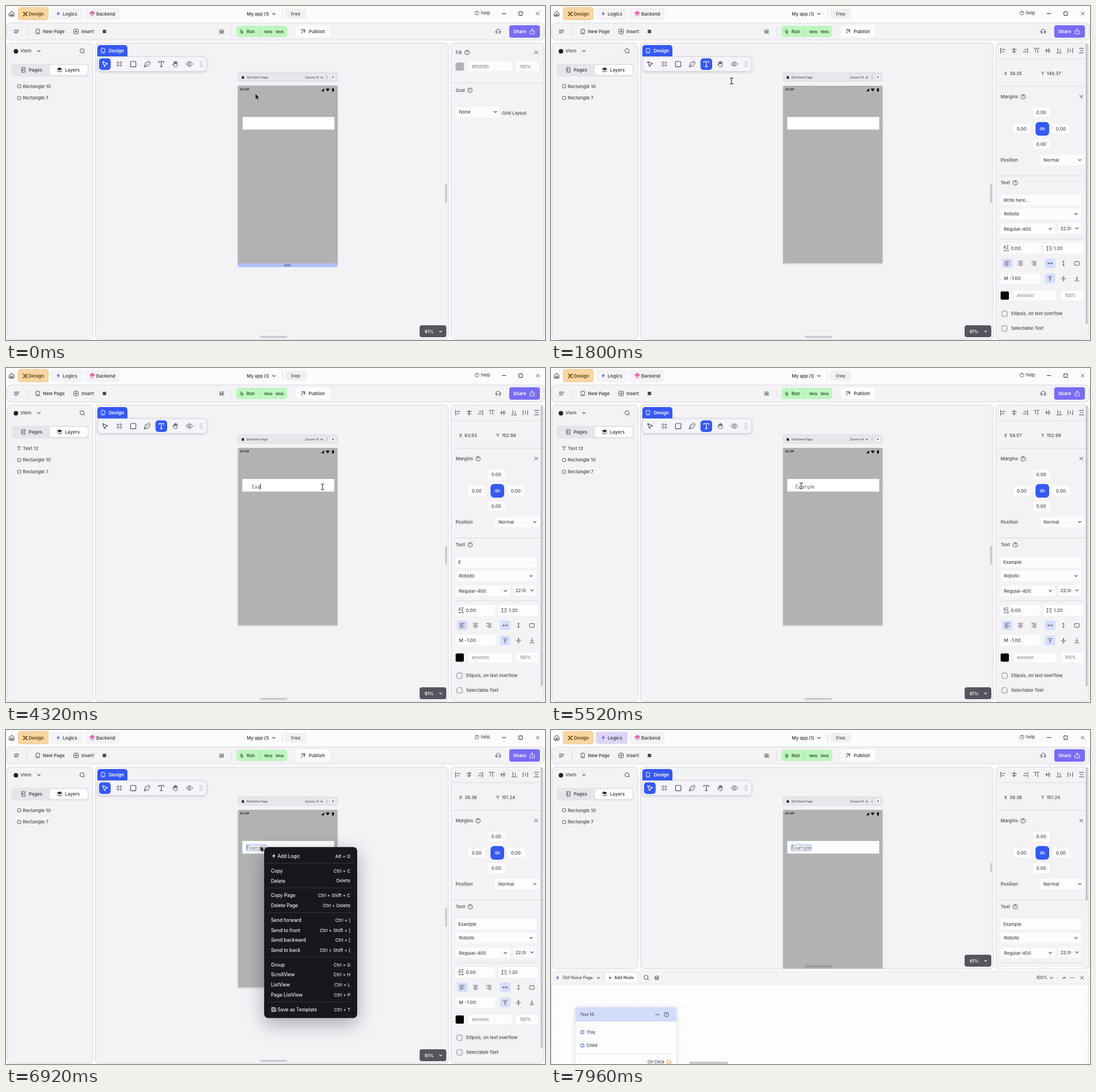
Write an HTML page with a canvas that moves like this. It is 950 px wide and 590 px high and loops after 8000 ms.

```html
<!DOCTYPE html>
<html lang="en">
<head>
<meta charset="utf-8">
<title>App builder</title>
<style>
html, body { margin: 0; width: 100%; height: 100%; overflow: hidden; background: #fbfbfd; }
canvas { display: block; width: 950px; height: 590px; }
</style>
</head>
<body>
<canvas id="stage"></canvas>
<script>
const W = 950, H = 590, LOOP = 8000;
const BLUE = '#3559f4', INK = '#48484e', DARK = '#232328', PANEL = '#f3f3f6', EDGE = '#cfcfd8';
const BRAND = 'Vlem', DEVICE = 'Zuvone 14';
const canvas = document.getElementById('stage');
const dpr = window.devicePixelRatio || 1;
canvas.width = W * dpr;
canvas.height = H * dpr;
const c = canvas.getContext('2d');

// Times in ms
const AT = { tip: 440, pick: 1560, place: 3600, commit: 5300, select: 5760, drop: 6240, menu: 6600, logic: 7400 };
const KEYS = [4020, 4150, 4270, 4480, 4620, 4760, 4900];
const PATH = [
  [0, 440, 156], [60, 440, 156], [420, 310, 103], [AT.pick, 273, 103], [1900, 330, 140],
  [2500, 492, 214], [2880, 492, 214], [3450, 434, 210], [3800, 434, 210], [4200, 558, 210],
  [4750, 558, 210], [5400, 441, 208], [5900, 441, 208], [6200, 434, 206], [6500, 449, 206],
  [7000, 449, 206], [7200, 490, 222], [LOOP, 490, 222]
];

const lerp = (a, b, k) => a + (b - a) * k;
const ease = k => k * k * (3 - 2 * k);
const part = (t, a, b) => ease(Math.min(1, Math.max(0, (t - a) / (b - a))));

function box(x, y, w, h, r, fill, stroke, lw = 0.8) {
  c.beginPath();
  c.roundRect(x, y, w, h, r);
  if (fill) { c.fillStyle = fill; c.fill(); }
  if (stroke) { c.strokeStyle = stroke; c.lineWidth = lw; c.stroke(); }
}

function shadowBox(x, y, w, h, r, fill, blur, dy, shade) {
  c.save();
  c.shadowColor = shade;
  c.shadowBlur = blur * dpr;
  c.shadowOffsetY = dy * dpr;
  box(x, y, w, h, r, fill);
  c.restore();
}

function text(s, x, y, size = 8, weight = 500, color = INK, align = 'left', family = 'Inter') {
  c.font = `${weight} ${size}px ${family}, sans-serif`;
  c.textAlign = align;
  c.fillStyle = color;
  c.fillText(s, x, y + size * 0.36);
}

// SVG path data drawn around a centre point
function icon(d, x, y, color = INK, lw = 1, fill = false) {
  c.save();
  c.translate(x, y);
  c.lineCap = c.lineJoin = 'round';
  const p = new Path2D(d);
  if (fill) { c.fillStyle = color; c.fill(p); }
  if (lw) { c.strokeStyle = color; c.lineWidth = lw; c.stroke(p); }
  c.restore();
}

function dot(x, y, r, fill, stroke, lw = 0.9) {
  c.beginPath();
  c.arc(x, y, r, 0, 7);
  if (fill) { c.fillStyle = fill; c.fill(); }
  if (stroke) { c.strokeStyle = stroke; c.lineWidth = lw; c.stroke(); }
}

function rule(x1, y1, x2, y2, color = '#d3d3da', lw = 0.8) {
  icon(`M${x1} ${y1}L${x2} ${y2}`, 0, 0, color, lw);
}

function clip(x, y, w, h, r, draw) {
  c.save();
  c.beginPath();
  c.roundRect(x, y, w, h, r);
  c.clip();
  draw();
  c.restore();
}

const chevron = (x, y, color = INK, s = 2.3) => icon(`M${-s} ${-s / 2}L0 ${s / 2}L${s} ${-s / 2}`, x, y, color, 1.1);
const cross = (x, y) => icon('M-2.6-2.6L2.6 2.6M2.6-2.6L-2.6 2.6', x, y, INK, 1);
const search = (x, y) => { dot(x - 0.5, y - 0.5, 3.6, null, INK, 1); icon('M2.2 2.2L4 4', x, y); };
const more = (x, y) => [-2.5, 0, 2.5].forEach(d => dot(x + d, y, 0.85, INK));
const field = (x, y, w, h) => box(x, y, w, h, 3, '#fdfdfe');

function help(x, y) {
  dot(x, y, 4, null, INK, 0.9);
  text('?', x, y, 6, 600, INK, 'center');
}

function bug(x, y) {
  icon('M-2-1.2C-2-4 2-4 2-1.2V1.5C2 4.4-2 4.4-2 1.5ZM-4 .4H-2M2 .4H4M-3.7-3L-2-1.6M3.7-3L2-1.6M-3.7 3.6L-2 2.3M3.7 3.6L2 2.3M-1 0H1M-1 1.7H1', x, y, INK, 0.9);
}

const BOLT = 'M1-4.2L-2.8 .8H-.4L-1 4.2L2.8-.9H.4Z';
const PHONE = 'M-2-4H2Q3-4 3-3V3Q3 4 2 4H-2Q-3 4-3 3V-3Q-3-4-2-4M-.8 2.4H.8';
const HOME = 'M-4-.5L0-4.3L4-.5V4.2H-4ZM-1.2 4V1H1.2V4';

function titleBar(logicOn) {
  icon(HOME, 10, 13.5, DARK, 1);
  box(21.5, 2.5, 53, 22, 4, '#fad5a0', '#efc186');
  icon('M-3.2 3.2L3.2-3.2M-3.2-3.2L3.2 3.2', 34, 14, '#6b4a16', 1.8);
  text('Design', 40, 14, 8, 600, '#594019');
  box(79, 3, 56, 21.5, 4, logicOn ? '#dcd5f7' : '#f4f4f7');
  icon(BOLT, 92, 13.5, '#5c5cf2', 0, true);
  text('Logics', 100, 14, 8, 600);
  box(138.5, 3, 62, 21.5, 4, '#f3f3f6');
  icon('M-3 1C-5.4 .6-4.4-2.3-2.3-2C-1.5-4.8 2.6-4.6 2.7-1.8C5-1.7 4.7 1 3 1Z', 152, 13, '#ef62a6', 0.5, true);
  icon('M-2 2V4M0 2V5M2 2V4', 152, 13, '#e05aa8', 1);
  text('Backend', 159, 14, 8, 600);
  text('My app (1)', 424.5, 14, 7.8, 600);
  chevron(472, 14);
  rule(487.5, 5, 487.5, 22);
  box(492, 5, 37, 17, 4, '#f0f0f3');
  text('Free', 510.5, 14, 7.8, 500, INK, 'center');
  dot(830, 12.5, 3.4, null, INK, 0.8);
  text('?', 830, 12.5, 5, 600, INK, 'center');
  text('help', 837, 12.5, 7.8);
  rule(874.5, 13.5, 881, 13.5, DARK, 1);
  box(904, 10.3, 6.2, 6.2, 0.5, null, DARK, 1);
  cross(937, 13.5);
}

function toolbar() {
  box(1.5, 30, 947, 30, 7, PANEL, EDGE);
  icon('M-4-2.5H4M-4 0H4M-4 2.5H2', 18.5, 45, INK, 1);
  rule(37.5, 38, 37.5, 52);
  icon(PHONE, 56, 45);
  text('New Page', 65, 45, 7.9, 600);
  box(119.5, 41, 8, 8, 1.5, null, INK, 1);
  icon('M-2 0H2M0-2V2', 123.5, 45, INK, 1);
  text('Insert', 133, 45, 7.9, 600);
  box(170.5, 42, 6, 6, 0, INK);
  bug(380, 45);
  rule(397.5, 38, 397.5, 52);
  box(406, 35, 89.5, 20, 5, '#bff6bf');
  icon('M-1.5-3V1L-3 0L0 4H2L3 1V-1L.5-.5V-3Z', 415, 45, '#5fa565', 0.6, true);
  text('Run', 424, 45, 7.8, 600, '#31523a');
  rule(447, 38, 447, 52, '#a1dca4');
  text('Web', 455, 45.3, 6.8, 600, '#31523a');
  text('Web', 475, 45.3, 6.8, 600, '#31523a');
  box(511, 34.5, 60, 20.5, 4, '#fefefe');
  icon('M-3 3L3-3M-1.5-3H3V1.5M-3.2-2L-2-3', 523.5, 45, DARK, 1);
  text('Publish', 533.5, 45, 8, 600);
  icon('M-4 1V0C-4-5.2 4-5.2 4 0V1M-4 0H-1.8V3.2H-3.4L-4 2ZM4 0H1.8V3.2H3.4L4 2Z', 867.5, 45, INK, 0.9);
  box(887, 34, 54, 22, 4, '#796cf6');
  text('Share', 894, 45, 8.1, 600, '#fff');
  icon('M0 1V-4.5M-2-2.7L0-4.5L2-2.7M-2.4-.8H-4V4.2H4V-.8H2.4', 927.5, 45, '#fff', 0.9);
}

function leftPanel(bottom, hasText) {
  box(2, 65.5, 151, bottom - 65.5, 7, PANEL, EDGE);
  dot(17.5, 80, 4, '#222226');
  text(BRAND, 25.5, 79.5, 7.9, 500);
  chevron(58, 79.5);
  search(134.5, 79.5);
  box(9.5, 102, 136, 22.5, 5, '#e6e6ea');
  shadowBox(77, 104, 67, 18.5, 5, '#fff', 2, 0.5, 'rgba(0,0,0,.15)');
  icon('M-2.5-4H3V4H-2.5V2M-2.5-4V-2M-4.5 0H0M-1.5-1.7L.2 0L-1.5 1.7', 30.5, 113, INK, 1);
  text('Pages', 40, 113, 8, 600);
  icon('M0-4L4.3-1.8L0 .4L-4.3-1.8Z', 94.5, 113, DARK, 0.6, true);
  icon('M-4 .8L0 3L4 .8', 94.5, 113.5, DARK, 1);
  text('Layers', 104, 113, 8, 600);
  const rows = ['Rectangle 10', 'Rectangle 7'];
  if (hasText) rows.unshift('Text 12');
  rows.forEach((name, i) => {
    const y = 141.7 + i * 20.8;
    if (name[0] === 'T') icon('M-2.7-1.5V-2.8H2.7V-1.5M0-2.8V2.8M-1 2.8H1', 23, y, INK, 0.8);
    else box(20.3, y - 2.7, 5.6, 5.6, 0.8, null, INK, 0.9);
    text(name, 29.5, y, 8.1);
  });
}

function tools(active) {
  box(161, 69, 53, 20, [5, 5, 0, 0], BLUE);
  icon(PHONE, 171, 79, '#fff', 0.9);
  text('Design', 181, 79, 8, 600, '#fff');
  shadowBox(161.5, 89.5, 192, 26, 6, '#f4f4f9', 4, 1, 'rgba(60,60,90,.3)');
  box(161.5, 89.5, 192, 26, 6, null, '#d4d4de');
  box(active === 'text' ? 263.5 : 164, 92.5, 20.5, 20.5, 5, BLUE);
  icon('M-4.2-4.5L4.7-.6L1 .8L-.7 4.6Z', 174.5, 102.7, active === 'select' ? '#fff' : INK, 1.1);
  icon('M-2.3-5V5M2.3-5V5M-5-2.3H5M-5 2.3H5', 199.7, 102.5, '#77777e', 1);
  box(219.5, 98, 9.4, 9.4, 1, null, INK, 1.1);
  icon('M-5 5L-3-2.2L1.4-3.6L4.2-.8L2.6 3ZM-5 5L-.5 .5M1.5-4.2L3-5.5L5.8-2.7L4.6-1.2', 248.7, 102.4, INK, 0.9);
  icon('M-4.3-2.5V-4.6H4.3V-2.5M0-4.6V4.6M-1.8 4.6H1.8', 273.7, 102.6, active === 'text' ? '#fff' : INK, 1.2);
  icon('M-3 1V-2.8Q-2.3-4-1.5-2.8V0V-4Q-.7-5.4 0-4V0V-4Q.8-5.3 1.6-4V0V-2.8Q2.4-4 3.2-2.8V1.5Q3.2 5.2 0 5.2Q-2 5.2-5 .8Q-4.5-.4-3 1', 298.7, 102.3, INK, 0.9);
  icon('M-5.8 0Q0-8 5.8 0Q0 8-5.8 0', 323.2, 102.5, INK, 1);
  dot(323.2, 102.5, 1.7, null, INK, 1);
  for (let i = 0; i < 8; i++) dot(342.5 + i % 2 * 3.2, 98.5 + (i >> 1) * 2.8, 0.8, '#a5a5ad');
}

function phone(selected, s) {
  const dx = selected ? 0 : -0.5;
  box(409, 118, 175, 15, 3, '#e7e7eb', selected ? '#c6cbe4' : '#d3d3dc');
  icon('M-2.8 0L0-2.7L2.8 0H2V2.6H-2V0Z', 417.5, 126, DARK, 0, true);
  text('Old Home Page', 424 + dx, 126, 5.1, 500);
  text(DEVICE, 527, 126, 4.9, 500);
  chevron(556.5, 126.3, INK, 1.5);
  [-2, 0, 2].forEach(d => dot(566, 126 + d, 0.6, INK));
  box(572, 121.5, 8.4, 8.4, 2, '#fbfbfd', '#d2d2da', 0.6);
  icon('M-1.5 0H1.5M0-1.5V1.5', 576.2, 125.7, DARK, 0.7);
  if (selected) {
    box(408.5, 454, 176, 7.3, [0, 0, 3, 3], '#afc0f8');
    box(408.5, 140.8, 176, 314, 1, '#b2b2b2', '#b4bfe6', 0.9);
    rule(490.5, 456.9, 502, 456.9, '#4c5683', 0.9);
    rule(490.5, 459.2, 502, 459.2, '#4c5683', 0.9);
  } else {
    shadowBox(409, 141, 175.3, 313.5, 0, '#b2b2b2', 4, 1.5, 'rgba(0,0,0,.13)');
  }
  text('23:24', 412.5, 147.3, 5.4, 700, '#151517');
  icon('M-2.6 2.7H2.6V-2.7Z', 558, 148, '#111', 0, true);
  icon('M-3.5-1.2Q0-4 3.5-1.2L0 2.8Z', 567, 148, '#111', 0, true);
  box(574.6, 145.2, 3.4, 5.8, 0.7, '#111');
  box(417 + dx, 196, 162, 22.3, 0, '#fff');
  if (s.label) text(s.label, s.tx, s.ty, 9, 300, '#28282c', 'left', 'Roboto');
  if (s.caret) {
    c.font = '300 9px Roboto, sans-serif';
    const x = s.tx + c.measureText(s.label).width + 0.6;
    rule(x, 205.3, x, 214.2, '#111', 1.1);
  }
  if (s.outlined) box(s.tx - 0.2, s.ty - 5, 34.6, 10, 0, null, '#5f82ee', 0.8);
}

function workArea(bottom, s) {
  box(157.5, 65.5, 622, bottom - 65.5, 7, PANEL, EDGE);
  clip(158, 66, 621, bottom - 66.5, 6, () => phone(s.pageOn, s));
  tools(s.tool);
  if (s.logic) box(774, 235, 3.2, 15.5, 1.5, '#c6c6cb');
  else box(774, 314, 3.2, 33.5, 1.5, '#c6c6cb');
  box(447.5, bottom - 6.3, 48, 3.6, 1.8, s.logic ? '#98989c' : '#c9c9cf');
  const y = bottom - 25;
  box(729, y, 47, 21, 4, '#55565d');
  text('61%', 738, y + 10.8, 7.6, 600, '#fff');
  chevron(766, y + 10.8, '#fff', 2);
}

function fillPanel() {
  text('Fill', 792.5, 82, 7.9);
  help(812.5, 82);
  cross(934.5, 82);
  box(792.5, 99.8, 14.5, 14.5, 2.5, '#b2b2b2');
  field(815, 98.5, 76, 16.5);
  text('#B5B5B5', 821, 107.3, 6.9, 400, '#77777d');
  field(899, 98.5, 40, 16.5);
  text('100%', 906, 107.3, 7.2, 400, '#66666c');
  rule(785, 136, 948, 136);
  text('Grid', 792.5, 148.7, 7.9);
  help(817.7, 148.7);
  field(792.5, 178, 77.5, 18.5);
  text('None', 798.5, 187, 7.9);
  chevron(862.5, 187);
  text('Grid Layout', 874.5, 189, 7.8);
}

function alignRow() {
  const side = 'M-4-4.5V4.5M-2-2H4M-2 2H2', mid = 'M0-4.5V4.5M-4-2H4M-3 2H3';
  const dist = 'M-4-4V4M4-4V4M0-2.5V2.5';
  [[side, 0], [mid, 0], [side, 2], [side, 1], [mid, 1], [side, 3], [dist, 0], [dist, 1]].forEach(([d, turn], i) => {
    c.save();
    c.translate(796.5 + i * 19.8, 78.8);
    c.rotate(turn * Math.PI / 2);
    icon(d, 0, 0, INK, 1);
    c.restore();
  });
}

function select(s, x, y, w, chevX) {
  field(x, y - 9.3, w, 18.6);
  text(s, x + 6, y, 7.9);
  chevron(chevX, y);
}

function textPanel(s) {
  alignRow();
  rule(785, 93, 948, 93);
  text(`X  ${s.px}`, 798.5, 118.8, 7.9);
  text(`Y  ${s.py}`, 864, 118.8, 7.9);
  rule(785, 142, 948, 142);
  text('Margins', 792.5, 160, 8);
  help(832, 160.3);
  cross(934.5, 160);
  for (const [x, y] of [[864, 188.3], [829.5, 216.7], [898.5, 216.7], [864, 244.3]]) {
    field(x - 14.5, y - 8.5, 30, 17);
    text('0.00', x, y, 7.9, 500, INK, 'center');
  }
  box(854, 205, 24, 24, 6, BLUE);
  icon('M-.7-2H-2C-4.6-2-4.6 2-2 2H-.7M.7-2H2C4.6-2 4.6 2 2 2H.7M-1.8 0H1.8', 866, 217, '#fff', 1);
  text('Position', 792.5, 272, 8);
  select('Normal', 862, 272, 78, 932);
  rule(785, 300, 948, 300);
  text('Text', 792.5, 312.3, 8);
  help(818.2, 312.3);
  field(792.5, 334, 142, 18.5);
  text(s.panelText, 797.2, 343.3, 7.8);
  select('Roboto', 792.5, 367.3, 142, 925.5);
  select('Regular-400', 792.5, 393.8, 96, 880);
  field(894, 383.5, 40, 18.5);
  clip(894, 384, 22.5, 18, 0, () => text('22.00', 898, 392.8, 7.9));
  chevron(927, 392.8);
  rule(793, 411.3, 938, 411.3);
  field(792.5, 418.5, 70, 19);
  text('AZ', 797, 426.8, 7.2);
  icon('M-4 0H4M-2.7-1.4L-4 0L-2.7 1.4M2.7-1.4L4 0L2.7 1.4', 802.5, 432, INK, 0.8);
  text('0.00', 810.5, 428, 7.9);
  field(868, 418.5, 70, 19);
  icon('M-3-3.7V3.7M-4.3-2.4L-3-3.7L-1.7-2.4M-4.3 2.4L-3 3.7L-1.7 2.4M.5-3H4.5M.5 0H4.5M.5 3H4.5', 878, 428, INK, 0.9);
  text('1.20', 886, 428, 7.9);
  const lines = x => [-3.6, -1.2, 1.2, 3.6].map((y, i) => {
    const w = i % 2 ? 5 : 8, left = -4 + (8 - w) * x;
    return `M${left} ${y}h${w}`;
  }).join('');
  box(795, 446, 18.5, 17, 3, '#d7defb');
  [0, 0.5, 1].forEach((k, i) => icon(lines(k), 804 + i * 23.5, 454.7, INK, 0.9));
  box(870.5, 446, 18.5, 17, 3, '#d7defb');
  icon('M-4 0H4M-2.6-1.6L-4 0L-2.6 1.6M2.6-1.6L4 0L2.6 1.6', 879.7, 454.7, INK, 0.9);
  icon('M0-4V4M-1.6-2.6L0-4L1.6-2.6M-1.6 2.6L0 4L1.6 2.6', 903.3, 454.7, INK, 0.9);
  box(922.7, 451.5, 8.2, 6.6, 0.8, null, INK, 0.9);
  field(792.5, 471.5, 70, 19);
  text('M', 798.5, 481, 7.9, 500);
  text('-1.00', 808.5, 481, 7.9);
  box(870.5, 473, 18.5, 17, 3, '#d7defb');
  icon('M-3.5-3.5H3.5M0-1.5V4M-1.7 .2L0-1.5L1.7 .2', 879.7, 481.7, INK, 0.9);
  icon('M-4 0H4M0-4.5V-1.5M0 4.5V1.5M-1.2-2.7L0-1.5L1.2-2.7M-1.2 2.7L0 1.5L1.2 2.7', 903.3, 481.7, INK, 0.9);
  icon('M-3.5 3.8H3.5M0-4V1.6M-1.7-.1L0 1.6L1.7-.1', 926.8, 481.7, INK, 0.9);
  box(792.5, 504.3, 14.5, 14.5, 2, '#000');
  field(815, 503, 76, 17);
  text('#000000', 821, 511.6, 6.8, 400, '#77777d');
  field(899, 503, 39, 17);
  text('100%', 906, 511.6, 7.2, 400, '#66666c');
  ['Ellipsis, on text overflow', 'Selectable Text'].forEach((label, i) => {
    const y = 543.5 + i * 26;
    box(794.7, y - 4.7, 9.4, 9.4, 2, null, '#77777e', 0.9);
    text(label, 811, y, 7.8);
  });
  box(942.7, 66, 3, s.logic ? 235 : 496, 1.5, '#bcbcc2');
}

function rightPanel(bottom, s) {
  box(784.5, 65.5, 163.5, bottom - 65.5, 7, PANEL, EDGE);
  clip(785, 66, 163, bottom - 66.5, 6, () => s.textOpts ? textPanel(s) : fillPanel());
}

function toolTip(t) {
  shadowBox(166, 124, 183, 145, 10, '#2b2b31', 26, 9, 'rgba(30,30,50,.32)');
  clip(173, 131, 169, 91, 7, () => {
    box(173, 131, 169, 91, 0, '#fbfbfc');
    box(286, 141, 56, 8, 0, '#e7e7ea');
    box(286, 149, 56, 73, 0, '#f7f7f9');
    rule(184, 133, 184, 222, '#eeeeF2', 0.5);
    for (const y of [142, 152, 162]) dot(177, y, 1.2, null, '#b5b5bb', 0.5);
    text('Text Page', 183, 156.7, 3.1, 400, '#606066');
    icon('M-1-1.5L1.6 .5L0 .7L-.7 2Z', 177, 173, '#444', 0, true);
    icon('M-1-1.5L1.6 .5L0 .7L-.7 2Z', 180, 156.5, '#444', 0, true);
  });
  box(173, 227.8, 169, 2.4, 1.2, '#5e5e66');
  box(173, 227.8, 169 * Math.min(1, (t - AT.tip) / 4800), 2.4, 1.2, '#c0c0c6');
  dot(186.3, 248.3, 13, '#17171b');
  dot(186.3, 248.3, 5.8, '#fff');
  text('Text tool', 207, 242.7, 9, 500, '#fff');
  text('Add text to page', 207, 257.2, 7.2, 500, '#f2f2f4');
}

const MENU = [
  ['Add Logic|Alt + Q'],
  ['Copy|Ctrl + C', 'Delete|Delete'],
  ['Copy Page|Ctrl + Shift + C', 'Delete Page|Ctrl + Delete'],
  ['Send forward|Ctrl + ]', 'Send to front|Ctrl + Shift + ]', 'Send backward|Ctrl + [', 'Send to back|Ctrl + Shift + ['],
  ['Group|Ctrl + G', 'ScrollView|Ctrl + H', 'ListView|Ctrl + L', 'Page ListView|Ctrl + P'],
  ['Save as Template|Ctrl + T']
];

function contextMenu() {
  shadowBox(455, 206.7, 164, 302, 7, '#17171d', 32, 10, 'rgba(20,20,40,.35)');
  let y = 223;
  MENU.forEach((group, g) => {
    if (g) { rule(461, y - 13.5, 613, y - 13.5, '#3b3b45', 0.8); }
    for (const item of group) {
      const [name, keys] = item.split('|');
      const inset = g === 0 || g === MENU.length - 1 ? 11.5 : 0;
      text(name, 467 + inset, y, 8.3, 500, '#f3f3f5');
      text(keys, 607, y, 8.1, 500, '#e6e6ea', 'right');
      y += 17.65;
    }
    y += 8.25;
  });
  icon(BOLT, 472, 222.5, '#fff', 0, true);
  icon('M-3.5-3.5H2L3.5-2V3.5H-3.5ZM-2-3.3V-1H1.5V-3.3M-2 3.3V.8H2V3.3', 472, 493.7, '#fff', 0.9);
}

function logicPanel() {
  box(1, 427, 946, 170, [6, 6, 0, 0], '#fdfdfe', EDGE);
  for (let y = 469; y < H; y += 19.8)
    for (let x = 5; x < 945; x += 19.55) dot(x, y, 0.8, '#ece6c4');
  box(1.5, 427.5, 945, 21.5, [6, 6, 0, 0], '#f4f4f7');
  rule(1, 449, 947, 449, '#dedee4');
  icon(BOLT, 11.5, 437.5, '#6a5cf4', 0, true);
  text('Old Home Page', 20.5, 437.5, 7.2);
  chevron(83.5, 437.8, INK, 2);
  rule(92, 432, 92, 443);
  box(97, 430, 54, 15, 3, '#fff');
  icon('M-2 0H2M0-2V2', 104, 437.7, DARK, 0.9);
  text('Add Node', 111.5, 437.7, 7.2, 600);
  search(168, 437.5);
  bug(186.3, 437.5);
  text('100%', 855, 437.7, 7.5);
  chevron(882, 437.8, INK, 2);
  rule(893, 432, 893, 443);
  icon('M-2.2 1.1L0-1.1L2.2 1.1', 904.5, 437.5, INK, 1.1);
  more(918.5, 437.5);
  cross(936, 437.7);
  shadowBox(43, 490, 178, 120, 4, '#fdfdfe', 7, 1, 'rgba(60,70,120,.25)');
  box(43, 490, 178, 25, [4, 4, 0, 0], '#d3dcfb');
  text('Text 14', 51, 502.7, 7.3);
  more(187.5, 502.7);
  help(203.5, 502.7);
  ['This', 'Child'].forEach((name, i) => {
    dot(55.3, 533.7 + i * 23.6, 2.9, '#fff', '#4f7df0', 1.2);
    text(name, 62.5, 533.9 + i * 23.6, 7.7);
  });
  rule(48, 572, 215, 572, '#e3e0cf');
  text('On Click', 170, 586.5, 7.4);
  icon('M-3.2-3.3H-.5L4 0L-.5 3.3H-3.2Z', 208, 586.8, '#e9a53c', 1.2);
  box(243.5, 586, 68.5, 4, 1.5, '#c9c9ce');
}

function pointer(t, tool) {
  if ((t > 300 && t < 1760) || t > 7080) return;
  let i = 1;
  while (PATH[i][0] < t) i++;
  const [t0, x0, y0] = PATH[i - 1], [t1, x1, y1] = PATH[i];
  const k = part(t, t0, t1), x = lerp(x0, x1, k), y = lerp(y0, y1, k);
  if (tool === 'text') {
    const beam = 'M-2.6-5H-1Q0-5 0-4V4Q0 5-1 5H-2.6M2.6-5H1Q0-5 0-4M0 4Q0 5 1 5H2.6';
    icon(beam, x, y, '#fff', 2.2);
    icon(beam, x, y, '#222', 1.1);
  } else {
    const arrow = 'M0 0V7.8L1.8 6.2L3.1 9.1L4.6 8.4L3.3 5.6H5.6Z';
    icon(arrow, x, y, '#8d8d92', 0.9);
    icon(arrow, x, y, '#18181c', 0, true);
  }
}

function stateAt(t) {
  const typed = KEYS.filter(k => t >= k).length;
  const drag = part(t, 5900, 6200);
  const settled = t >= AT.commit;
  const s = {
    tool: t >= AT.pick && t < AT.select ? 'text' : 'select',
    pageOn: t < AT.pick,
    textOpts: t >= AT.pick,
    hasText: t >= AT.place && t < AT.drop,
    logic: t >= AT.logic,
    label: 'Example'.slice(0, typed),
    tx: settled ? lerp(430.7, 424, drag) : 433.5,
    ty: lerp(210, 208, drag),
    caret: t >= AT.place && t < AT.commit,
    outlined: t >= AT.select,
    panelText: 'Write here...',
    px: '38.35', py: '148.37'
  };
  if (t >= AT.place) {
    s.px = settled ? lerp(54.57, 38.36, drag).toFixed(2) : '63.93';
    s.py = lerp(152.98, 151.24, drag).toFixed(2);
  }
  // The side field lags behind the keys
  const shown = KEYS.filter(k => t - 220 >= k).length;
  if (shown) s.panelText = 'Example'.slice(0, shown);
  return s;
}

function draw(t) {
  const s = stateAt(t);
  const bottom = s.logic ? 422 : 589;
  c.setTransform(dpr, 0, 0, dpr, 0, 0);
  c.fillStyle = '#fcfcfe';
  c.fillRect(0, 0, W, H);
  titleBar(s.logic);
  toolbar();
  leftPanel(bottom, s.hasText);
  workArea(bottom, s);
  rightPanel(bottom, s);
  if (t >= AT.tip && t < AT.pick) toolTip(t);
  if (s.logic) logicPanel();
  pointer(t, s.tool);
  if (t >= AT.menu && !s.logic) contextMenu();
}

function frame() {
  draw(performance.now() % LOOP);
  requestAnimationFrame(frame);
}
frame();
</script>
</body>
</html>
```
